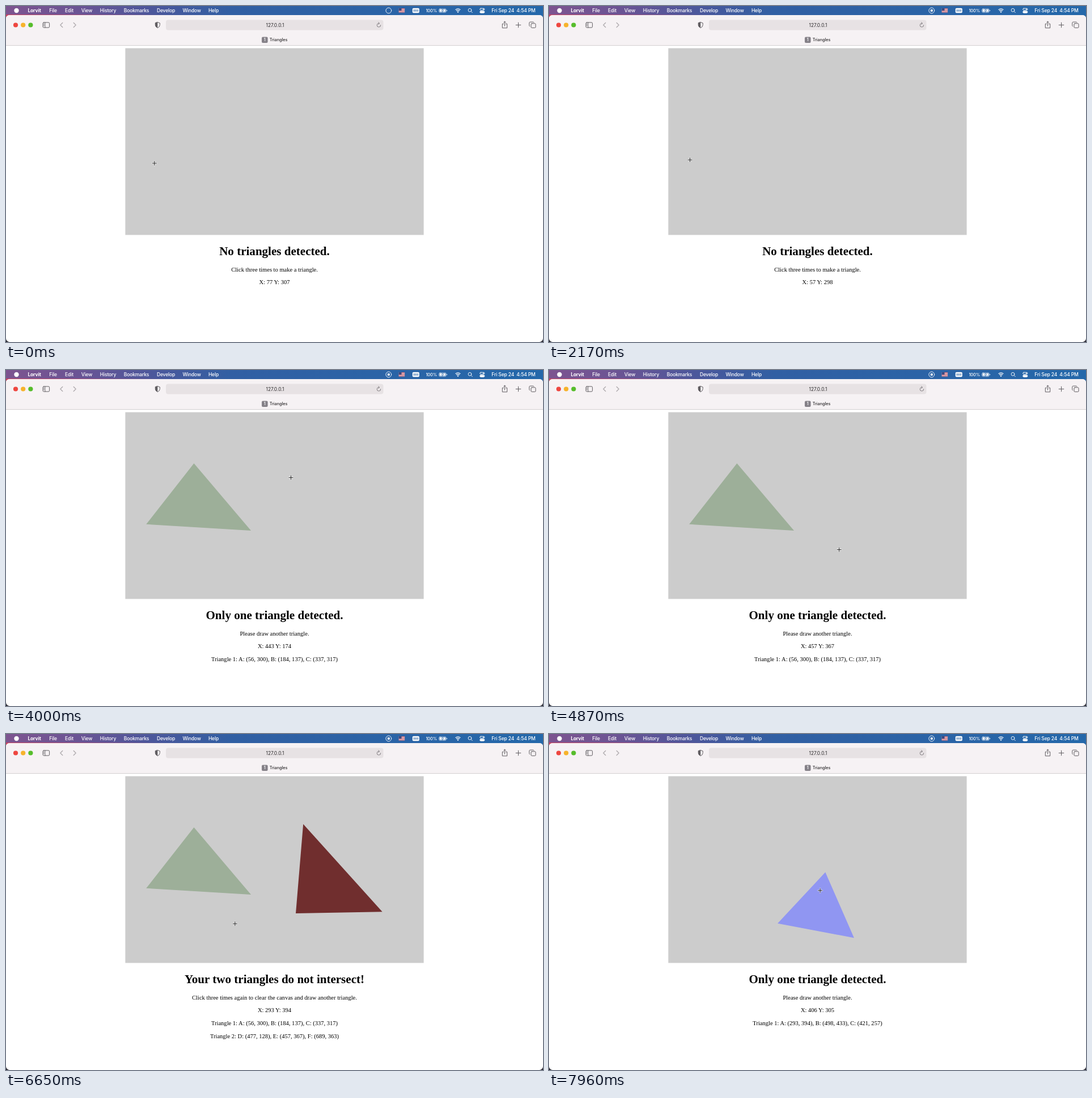
Animation of 947 by 592 pixels, one loop 8 s. Source, as an HTML page:

```html
<!DOCTYPE html>
<html lang="en">
<head>
<meta charset="utf-8">
<title>Triangles</title>
<style>
html, body { margin: 0; width: 100%; height: 100%; overflow: hidden; background: #fff; }
svg { display: block; width: 100vw; height: 100vh; }
.ui { font-family: Inter, "Liberation Sans", sans-serif; }
.menu { font-size: 8.55px; font-weight: 500; letter-spacing: -.02em; fill: #fff; }
.page { font: 10.53px "Liberation Serif", "Times New Roman", serif; }
.mid { text-anchor: middle; }
.line { fill: none; stroke-linecap: round; stroke-linejoin: round; }
</style>
</head>
<body>
<svg viewBox="0 0 947 592" xmlns="http://www.w3.org/2000/svg">
  <defs>
    <linearGradient id="sky">
      <stop offset="0" stop-color="#7d5490"/><stop offset=".13" stop-color="#6b5494"/>
      <stop offset=".27" stop-color="#4c579b"/><stop offset=".42" stop-color="#315fa3"/>
      <stop offset="1" stop-color="#2468aa"/>
    </linearGradient>
    <linearGradient id="glow">
      <stop offset="0" stop-color="#c8435f"/><stop offset=".3" stop-color="#c8435f" stop-opacity="0"/>
    </linearGradient>
  </defs>

  <rect width="947" height="592" fill="#2b2a33"/>
  <rect width="947" height="30" fill="url(#sky)"/>
  <rect y="15" width="947" height="12" fill="url(#glow)"/>
  <rect y="16" width="947" height="576" rx="6.5" fill="#fff"/>
  <path d="M0 69.5V22.5Q0 16 6.5 16H940.5Q947 16 947 22.5V69.5Z" fill="#f6f2f4"/>
  <path d="M0 69.5H947" stroke="#d3cfd1"/>

  <g class="ui menu">
    <circle cx="18.5" cy="8" r="4.2"/>
    <g id="menus" class="mid"></g>
    <g class="line" stroke="#fff" stroke-width=".9">
      <circle id="ring" cx="674.8" cy="8" r="4.9"/>
      <path d="M793 6.4Q797 3.2 801 6.4M794.6 8.3Q797 6.4 799.4 8.3" stroke-width="1.3"/>
      <circle cx="818" cy="7.3" r="2.9"/><path d="M820.2 9.5L822.4 11.7"/>
      <rect x="835.7" y="4.2" width="8.2" height="3.2" rx="1.6"/>
      <rect x="835.7" y="9" width="8.2" height="3.2" rx="1.6" fill="#fff"/>
      <rect x="763.7" y="5" width="12.4" height="6.2" rx="1.8" stroke-width=".7"/>
    </g>
    <rect id="stop" x="672.9" y="6.1" width="3.8" height="3.8" rx=".7"/>
    <circle cx="797" cy="10.4" r="1.2"/>
    <circle cx="841.9" cy="5.8" r="1"/>
    <rect x="764.7" y="6" width="10.4" height="4.2" rx="1"/>
    <path d="M777 7v2.2q1.2-.3 1.2-1.1t-1.2-1.1z"/>
    <path d="M770.8 4.4L767.8 8.6H769.7L769 11.8L772 7.5H770.1Z" stroke="#2b65a6" stroke-width=".6"/>
    <rect x="692.7" y="4" width="10.4" height="7.4" fill="#eee1e4"/>
    <path d="M692.7 4.6h10.4m-10.4 2.1h10.4m-10.4 2.1h10.4m-10.4 2.1h10.4" stroke="#b8465a" stroke-width="1"/>
    <rect x="692.7" y="4" width="4.8" height="4.1" fill="#3b4a80"/>
    <rect x="716.8" y="3.8" width="12" height="8.4" rx="1.8"/>
    <path d="M719.3 6v4m2.3-4v4m2.3-4v4m2.3-4v4" stroke="#2b65a6" stroke-width="1"/>
    <text x="740.4" y="11" font-size="7.6">100%</text>
    <text x="895" y="11" class="mid" xml:space="preserve">Fri Sep 24  4:54 PM</text>
  </g>

  <circle cx="17" cy="33.5" r="4.1" fill="#ee4740"/>
  <circle cx="30.2" cy="33.5" r="4.1" fill="#f6b32c"/>
  <circle cx="43.4" cy="33.5" r="4.1" fill="#56bd2b"/>
  <g class="line" stroke="#5f5c60" stroke-width="1">
    <rect x="65" y="29" width="11.6" height="9" rx="1.7"/>
    <path d="M69 29v9M66.5 31.4h1M66.5 33.2h1M66.5 35h1" stroke-width=".8"/>
    <path d="M99.8 29.5L95.8 33.5L99.8 37.5M119.2 29.5L123.2 33.5L119.2 37.5" stroke="#aaa6a9" stroke-width="1.2"/>
    <path d="M267.3 28.6L271.3 30V33.5Q271.3 36.8 267.3 38.6Q263.3 36.8 263.3 33.5V30Z"/>
    <path d="M267.3 28.6V38.6Q263.3 36.8 263.3 33.5V30Z" fill="#5f5c60" stroke="none"/>
    <path d="M877.5 31.5h-2.2v7.2h8.4v-7.2h-2.2M879.5 35.3V27.3M877.4 29.2L879.5 27.1L881.6 29.2"/>
    <path d="M899.2 33.5h8.6M903.5 29.2v8.6"/>
    <rect x="926" y="30.8" width="8" height="7.6" rx="1.4"/>
    <path d="M923.6 35.8Q922.8 35.5 922.8 34.6V29.8Q922.8 28.2 924.4 28.2H929.4Q930.8 28.2 931 29.2"/>
  </g>
  <rect x="282" y="24.5" width="383.5" height="18" rx="4" fill="#e7e2e4"/>
  <path class="line" d="M660.8 33.6A3.3 3.3 0 1 1 657.8 30.5M656.8 28.8L658.7 30.6L656.8 32.3" stroke="#6b686b" stroke-width=".8"/>
  <g class="ui" fill="#2d2b2d">
    <text x="474.4" y="36.9" class="mid" font-size="8.4">127.0.0.1</text>
    <rect x="451" y="54.5" width="10.6" height="10.6" rx="2" fill="#858188"/>
    <text x="456.3" y="62.4" class="mid" font-size="7" font-weight="600" fill="#fff">1</text>
    <text x="480.5" y="62.4" class="mid" font-size="7.3" font-weight="500" letter-spacing="-.05">Triangles</text>
  </g>

  <rect x="210.4" y="74.4" width="526.2" height="329" fill="#ccc"/>
  <g id="shapes"></g>
  <g class="page mid">
    <text id="title" x="473.5" y="439" font-size="21.05" font-weight="bold"></text>
    <text id="hint" x="473.5" y="467.8"></text>
    <text id="pos" x="473.5" y="490.2"></text>
    <text id="row1" x="473.5" y="512.8"></text>
    <text id="row2" x="473.5" y="536.2"></text>
  </g>
  <g id="cursor">
    <path d="M-4.6 0H4.6M0 -4.6V4.6" stroke="#fff" stroke-opacity=".75" stroke-width="2.4"/>
    <path d="M-4 0H4M0 -4V4" stroke="#111" stroke-width=".9"/>
  </g>
</svg>
<script>
const LOOP = 8000, SCALE = 0.6578, LEFT = 210.4, TOP = 74.5;
const $ = id => document.getElementById(id);

const menus = { Lorvit: 50, File: 83, Edit: 111.5, View: 142.5, History: 180,
  Bookmarks: 230, Develop: 282, Window: 327.5, Help: 366 };
$('menus').innerHTML = Object.entries(menus).map(([name, x], i) =>
  `<text x="${x}" y="11"${i ? '' : ' font-weight="700"'}>${name}</text>`).join('');

// pointer stops in canvas units: arrive, leave, x, y
const stops = [
  [0, 0, 77, 307], [800, 900, 63, 293], [1700, 2170, 57, 298], [2240, 2400, 56, 300],
  [2820, 2950, 184, 137], [3420, 3620, 337, 317], [4180, 4320, 477, 128],
  [4820, 4980, 457, 367], [5500, 5660, 689, 363], [6500, 6720, 293, 394],
  [7120, 7240, 498, 433], [7600, 7730, 421, 257], [7960, LOOP, 406, 305]
];

const green = { fill: '#9daf99', pts: [[56, 300], [184, 137], [337, 317]] };
const red = { fill: '#702e2e', pts: [[477, 128], [457, 367], [689, 363]] };
const blue = { fill: '#9096f2', pts: [[293, 394], [498, 433], [421, 257]] };
const scenes = [[0, []], [3560, [green]], [5600, [green, red]], [7690, [blue]]];

const messages = [
  ['No triangles detected.', 'Click three times to make a triangle.'],
  ['Only one triangle detected.', 'Please draw another triangle.'],
  ['Your two triangles do not intersect!', 'Click three times again to clear the canvas and draw another triangle.']
];

const toStage = ([x, y]) => [LEFT + x * SCALE, TOP + y * SCALE];
const ease = u => u * u * (3 - 2 * u);

function pointer(t) {
  const i = stops.findLastIndex(s => t >= s[0]);
  const [, leave, x, y] = stops[i];
  if (t <= leave || i === stops.length - 1) return [x, y];
  const [arrive, , x2, y2] = stops[i + 1];
  const k = ease((t - leave) / (arrive - leave));
  return [Math.round(x + (x2 - x) * k), Math.round(y + (y2 - y) * k)];
}

function describe(tri, n) {
  if (!tri) return '';
  const names = n === 1 ? 'ABC' : 'DEF';
  return `Triangle ${n}: ` + tri.pts.map((p, i) => `${names[i]}: (${p.join(', ')})`).join(', ');
}

let shown = null;
function showScene(scene) {
  if (scene === shown) return;
  shown = scene;
  const tris = scene[1];
  $('shapes').innerHTML = tris.map(s =>
    `<polygon points="${s.pts.map(toStage).join(' ')}" fill="${s.fill}"/>`).join('');
  [$('title').textContent, $('hint').textContent] = messages[tris.length];
  $('row1').textContent = describe(tris[0], 1);
  $('row2').textContent = describe(tris[1], 2);
}

function render(t) {
  const p = pointer(t), [x, y] = toStage(p);
  showScene(scenes.findLast(s => t >= s[0]));
  $('pos').textContent = `X: ${p[0]} Y: ${p[1]}`;
  $('cursor').setAttribute('transform', `translate(${x + 0.7} ${y + 0.6})`);

  // recording indicator: ring, turning dashes, then a stop button
  const busy = t >= 250 && t < 1500;
  $('ring').setAttribute('stroke-dasharray', busy ? '1.3 1.27' : 'none');
  $('ring').setAttribute('stroke-opacity', busy ? 0.7 : 1);
  $('ring').setAttribute('transform', `rotate(${busy ? t * 0.12 : 0} 674.8 8)`);
  $('stop').setAttribute('visibility', t >= 1500 ? 'visible' : 'hidden');
}

const start = performance.now();
function tick() {
  render((performance.now() - start) % LOOP);
  requestAnimationFrame(tick);
}
tick();
</script>
</body>
</html>
```
